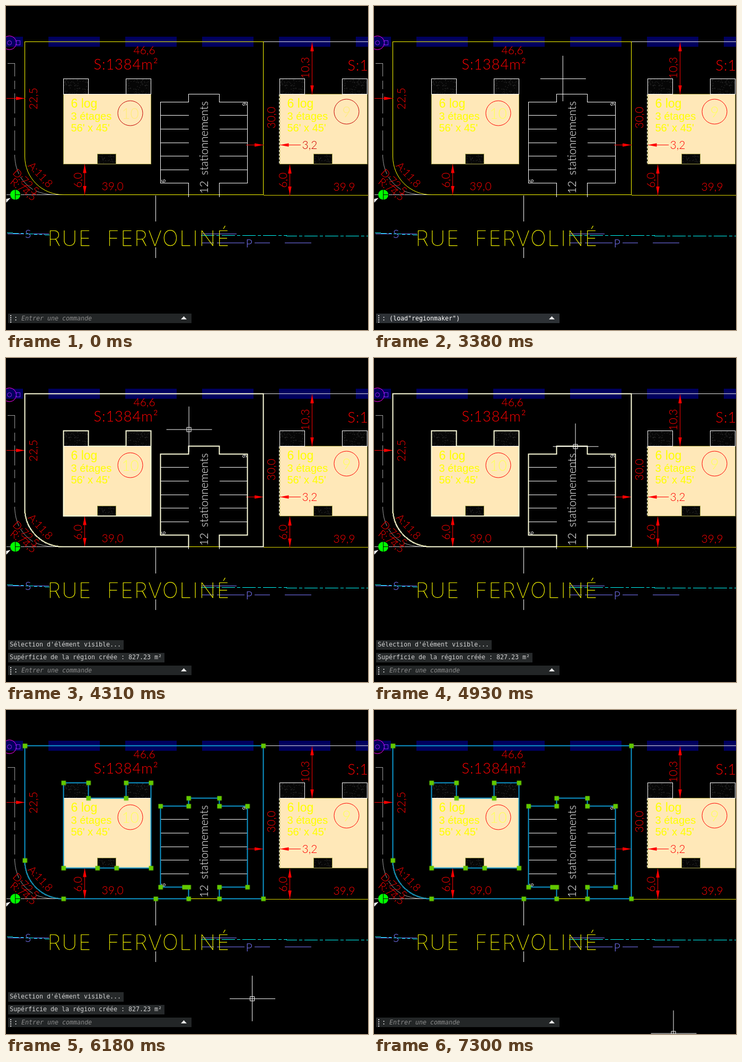
Write an HTML page that moves like this. It is 683 by 612 pixels and loops after 7330 ms.

```html
<!DOCTYPE html>
<html lang="fr">
<head>
<meta charset="utf-8">
<title>Plan de lots</title>
<style>
html, body { margin: 0; width: 100%; height: 100%; overflow: hidden; background: #000; }
svg { display: block; width: 683px; height: 612px; }
.line { fill: none; stroke-width: 1; shape-rendering: crispEdges; }
.curve { fill: none; stroke-width: 1; }
.crisp { shape-rendering: crispEdges; }
.white { stroke: #fff; }
.yellow { stroke: #ff0; }
.grey { stroke: #a0a0a0; }
.red { stroke: #f00; }
.violet { stroke: #7b78ff; }
.cyan { stroke: #0ff; }
.cad { font: 300 21px Lato, sans-serif; }
.dim { fill: #f00; }
.street { font: 100 40px Inter, sans-serif; fill: #ff0; stroke: #ff0; stroke-width: .25; letter-spacing: 2.4px; }
.info { font: 20px "Liberation Sans", Arial, sans-serif; fill: #ff0; }
.mono { font: 11.63px "DejaVu Sans Mono", monospace; white-space: pre; }
.hint { font-style: italic; }

/* one clock for every part */
.t { animation: 7330ms step-end infinite; }
.cross { animation: move 7330ms linear infinite; }
.bar { animation-name: bar; }
.hint { animation-name: hint; }
.typed { animation-name: typed; }
.msg1 { animation-name: msg1; }
.msg2 { animation-name: msg2; }
.region { animation-name: region; }
.glow { animation-name: glow; }
.grips { animation-name: grips; }
.pick { animation-name: pick; }
.num { animation-name: num; font-size: 28px; }
.ring { animation-name: ring; }
.edge { animation-name: edge; }
.small { animation-name: small; }

@keyframes bar { 0%, 51.98% { fill: #232627 } 36.56% { fill: #2d3135 } }
@keyframes hint { 0%, 51.98% { fill: #8c8c8c; opacity: 1 } 36.56% { fill: #a8a8a8; opacity: 1 } 36.97% { opacity: 0 } }
@keyframes typed { 0%, 51.98% { opacity: 0 } 36.97% { opacity: 1 } }
@keyframes msg1 { 0% { opacity: 0 } 51.98% { opacity: 1 } 92.09% { opacity: .8 } 95.09% { opacity: .55 } 97.27% { opacity: .4 } 99.18% { opacity: .2 } 99.59%, 100% { opacity: 0 } }
@keyframes msg2 { 0% { opacity: 0 } 53.48% { opacity: 1 } 92.09% { opacity: .8 } 95.09% { opacity: .55 } 99.18% { opacity: .2 } 99.59%, 100% { opacity: 0 } }
@keyframes region { 0%, 68.9% { opacity: 0 } 52.8% { opacity: 1 } }
@keyframes glow { 0%, 68.9% { opacity: 0 } 67.7% { opacity: .35 } }
@keyframes grips { 0% { opacity: 0 } 68.9%, 100% { opacity: 1 } }
@keyframes pick { 0% { opacity: 0 } 53.48%, 100% { opacity: 1 } }
@keyframes num { 0% { fill: #ffec7c } 36.56%, 100% { fill: #ffff5c } }
@keyframes ring { 0% { stroke: #c40000 } 36.56%, 100% { stroke: #f00 } }
@keyframes edge { 0% { stroke: #a5a04a } 36.56%, 100% { stroke: #ffe8b8 } }
@keyframes small { 0% { fill: #d00000 } 36.56%, 100% { fill: #f00 } }
@keyframes move {
  0% { transform: translate(800px, 242px); animation-timing-function: step-end }
  38.88% { transform: translate(722px, 242px); animation-timing-function: ease-out }
  47.48%, 58.4% { transform: translate(340px, 132px) }
  58.8% { transform: translate(344px, 134px); animation-timing-function: ease-out }
  68.49%, 71.49% { transform: translate(380px, 167px); animation-timing-function: ease-in }
  75.44% { transform: translate(424px, 260px) }
  78.45% { transform: translate(435px, 366px); animation-timing-function: ease-out }
  81.45% { transform: translate(426px, 454px) }
  84.31% { transform: translate(463px, 544px); animation-timing-function: ease-out }
  88.95%, 100% { transform: translate(564px, 610px) }
}
</style>
</head>
<body>
<svg viewBox="0 0 683 612">
<defs>
  <pattern id="gravel" width="48" height="30" patternUnits="userSpaceOnUse">
    <rect width="48" height="30" fill="#060606"/>
    <path id="dots" stroke="#444" stroke-width="1"/>
  </pattern>
  <marker id="tip" markerUnits="userSpaceOnUse" markerWidth="18" markerHeight="8" refX="17" refY="3.5" orient="auto-start-reverse">
    <path d="M0 .2L17 3.5L0 6.8Z" fill="#f00"/>
  </marker>
  <marker id="grip" markerUnits="userSpaceOnUse" markerWidth="9" markerHeight="9" refX="4.5" refY="4.5">
    <rect width="9" height="9" fill="#62c800"/>
  </marker>
  <path id="outline" d="M35 67H485V356H402V334H455V181H402V166H344V181H291V334H336H344V356H282H108A72 72 0 0 1 35 284Z
    M108 137H155V166H226V137H273V298H208H172H108Z"/>
  <g id="house">
    <path d="M0 0H165V132H0Z" fill="#ffe8b8" class="crisp t edge"/>
    <path d="M0 -29H47V0H0ZM118 -29H165V0H118Z" fill="url(#gravel)" stroke="#fff" class="crisp"/>
    <rect x="64" y="113" width="35" height="19" fill="url(#gravel)" class="crisp t edge"/>
    <g class="info">
      <text x="14" y="25" font-size="23">6 log</text>
      <text x="14" y="48">3 étages</text>
      <text x="14" y="70">56' x 45'</text>
    </g>
  </g>
</defs>

<rect width="683" height="612"/>
<path class="crisp" d="M-65 67.5H683" stroke="#00005f" stroke-width="19" stroke-dasharray="97 48"/>
<g transform="translate(.5 .5)">

  <!-- road edge and symbols on the left -->
  <path class="line grey" d="M2 108H16V284" stroke-dasharray="38 8 16 8"/>
  <path class="curve grey" d="M16 284Q18 325 50 346Q66 355 90 356" stroke-dasharray="34 6"/>
  <path class="line" stroke="#ccc" d="M0 356H108"/>
  <circle class="curve" cx="6" cy="69" r="13" stroke="#f0f"/>
  <circle class="curve" cx="6" cy="69" r="4" stroke="#a020f0"/>
  <path class="line" d="M19 65H26V73H19Z" stroke="#8020f0"/>
  <circle cx="17" cy="356" r="9.5" fill="#0f0"/>
  <path class="line" d="M17 346V366M17 356H27" stroke="#000"/>
  <path d="M0 364L8 362L0 371Z" fill="#fff"/>

  <!-- lot lines -->
  <path class="line yellow" d="M108 356H485V67H35V284"/>
  <path class="curve yellow" d="M35 284A72 72 0 0 0 108 356"/>
  <path class="line" d="M485 357H683" stroke="#d8d000"/>
  <path class="line" d="M485 67H683" stroke="#e8e8e8"/>
  <path class="line white" d="M282 357V406M282 455V475"/>

  <use href="#house" x="108" y="166"/>
  <use href="#house" x="516" y="166"/>
  <path class="line white" d="M515 166V299" stroke-dasharray="4 3"/>
  <path class="line white" d="M155 166H226"/>

  <g class="cad" text-anchor="middle">
    <circle class="curve t ring" cx="234" cy="202" r="23.5"/>
    <circle class="curve t ring" cx="642" cy="199" r="23.5"/>
    <text class="t num" x="234" y="212">10</text>
    <text class="t num" x="642" y="209">9</text>
  </g>

  <!-- parking -->
  <path class="line white" d="M344 181H291V334H344V360M344 181V166H402V181H455V334H402V360
    M291 206H344M291 232H344M291 258H344M291 283H344M291 309H344
    M402 206H455M402 232H455M402 258H455M402 283H455M402 309H455"/>
  <g fill="#fff">
    <text class="cad" transform="translate(380 354) rotate(-90)" word-spacing="5">12 stationnements</text>
    <g style="font:11px 'Liberation Sans',Arial,sans-serif">
      <text transform="translate(300 333) rotate(-90)">6</text>
      <text transform="translate(453 188) rotate(-90)">9</text>
    </g>
  </g>

  <!-- dimensions -->
  <g class="line red">
    <path d="M0 174H35" marker-end="url(#tip)"/>
    <path d="M452 262H485" marker-end="url(#tip)"/>
    <path d="M555 262H516" marker-end="url(#tip)"/>
    <path d="M148 298V356" marker-start="url(#tip)" marker-end="url(#tip)"/>
    <path d="M535 299V357" marker-start="url(#tip)" marker-end="url(#tip)"/>
    <path d="M577 68V166" marker-start="url(#tip)" marker-end="url(#tip)"/>
  </g>
  <g class="cad dim">
    <text x="240" y="90">46,6</text>
    <text x="180" y="347">39,0</text>
    <text x="617" y="348">39,9</text>
    <text class="t small" x="558" y="269">3,2</text>
    <g style="font-size:27px" letter-spacing="1">
      <text x="165" y="119">S:1384m²</text>
      <text x="644" y="121">S:1</text>
    </g>
    <text transform="translate(58 195) rotate(-90)">22,5</text>
    <text transform="translate(507 231) rotate(-90)">30,0</text>
    <text transform="translate(571 137) rotate(-90)">10,3</text>
    <text transform="translate(142 343) rotate(-90)">6,0</text>
    <text transform="translate(529 343) rotate(-90)">6,0</text>
    <g style="font-size:20px">
      <text transform="translate(40 302) rotate(47)">A:11,8</text>
      <text transform="translate(11 316) rotate(44)">D:72,5</text>
      <text transform="translate(6 334) rotate(38)">R:74,5</text>
    </g>
  </g>

  <!-- street and services -->
  <path class="line cyan" d="M2 428L82 432" stroke-dasharray="22 4 5 4"/>
  <path class="line cyan" d="M368 433L683 434" stroke-dasharray="25 4 6 4"/>
  <path class="line violet" d="M2 430H33M50 430H80M368 430H434M368 447H391M397 447H449M468 447H497M525 447H575"/>
  <g class="cad" fill="#7b78ff" text-anchor="middle">
    <text x="41" y="437">S</text>
    <text x="458" y="455">P</text>
  </g>
  <text class="street" y="452"><tspan x="78">RUE</tspan> <tspan x="190">FERVOLINÉ</tspan></text>

  <!-- region -->
  <g class="line">
    <use class="t glow" href="#outline" stroke="#9fd4f0" stroke-width="8"/>
    <use class="t region" href="#outline" stroke="#ffffdc" stroke-width="2"/>
    <g class="t grips" stroke="#0d96cc" stroke-width="2" marker-start="url(#grip)" marker-mid="url(#grip)">
      <use href="#outline"/>
    </g>
  </g>
</g>

<!-- command line -->
<g class="mono" fill="#d2d2d2">
  <g class="t msg1">
    <rect x="4" y="533" width="218" height="18" fill="#26292a"/>
    <text x="7" y="545">Sélection d'élément visible...</text>
  </g>
  <g class="t msg2">
    <rect x="4" y="557" width="295" height="18" fill="#26292a"/>
    <text x="7" y="569">Supérficie de la région créée : 827.23 m²</text>
  </g>
  <rect class="t bar" x="4" y="581" width="346" height="18"/>
  <path d="M9 584V598" stroke="#ddd" stroke-width="2" stroke-dasharray="2 2"/>
  <text x="15" y="594" fill="#fff">:</text>
  <text class="t hint" x="29" y="594">Entrer une commande</text>
  <text class="t typed" x="29" y="594" fill="#fff">(load"regionmaker")</text>
  <path d="M330 592H341L335.5 586Z" fill="#e8e8e8"/>
</g>

<g class="cross">
  <g class="line white" transform="translate(.5 .5)">
    <path d="M-42.5 0H43.5M0 -43V43"/>
    <path class="t pick" d="M-4 -4H4V4H-4Z"/>
  </g>
</g>
</svg>
<script>
let seed = 7;
const rnd = n => (seed = seed * 16807 % 2147483647) % n;
let d = "";
for (let i = 0; i < 70; i++) d += `M${rnd(48)} ${rnd(30) + .5}h1`;
document.getElementById("dots").setAttribute("d", d);
</script>
</body>
</html>
```
